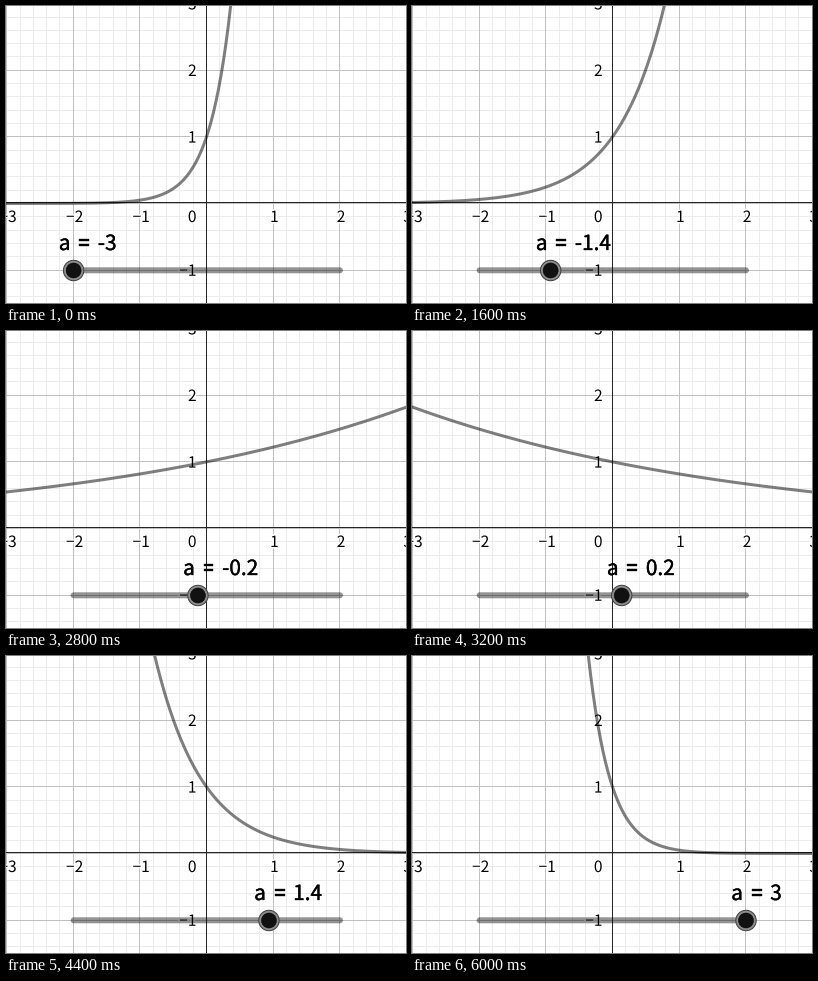
Write a matplotlib script that moves like this. It is 400 by 297 pixels and loops after 6200 ms.

```python
import numpy as np
import matplotlib.pyplot as plt
from matplotlib.animation import FuncAnimation
from matplotlib.patches import Circle
from matplotlib.patheffects import withStroke

W, H, DPI = 400, 297, 100
PX = 72 / DPI                # points per pixel
X0, Y0, UNIT = 200.5, 197.5, 66.6
FRAMES, LOOP = 31, 6200
TRACK_X, TRACK_Y, TRACK_HALF, A_MAX = 200.8, 264.3, 133.2, 3

plt.rcParams["font.family"] = "Noto Sans CJK JP"
fig = plt.figure(figsize=(W / DPI, H / DPI), dpi=DPI, facecolor="white")
ax = fig.add_axes([0, 0, 1, 1])
ax.set(xlim=(0, W), ylim=(H, 0))
ax.axis("off")


def px(x):
    return X0 + UNIT * x


def py(y):
    return Y0 - UNIT * y


def center(v):
    """Middle of the pixel that holds v."""
    return np.floor(v) + 0.5


def rule(x=None, y=None, color="black", z=1):
    xs, ys = ((center(x),) * 2, (0, H)) if y is None else ((0, W), (center(y),) * 2)
    ax.plot(xs, ys, color=color, lw=PX, zorder=z, snap=False)


def write(x, y, text, size, **kw):
    return ax.text(x, y, text, fontsize=size * PX, va="baseline", **kw)


def tick(x, y, n, ha):
    text = str(n).replace("-", "\u2212")
    write(x, y, text, 15.5, ha=ha, color="black", zorder=4,
          path_effects=[withStroke(linewidth=3 * PX, foreground="white")])


# Grid and axes
for k in range(-15, 16):
    color, z = ("#c0c0c0", 2) if k % 5 == 0 else ("#ececec", 1)
    rule(x=px(k / 5), color=color, z=z)
    rule(y=py(k / 5), color=color, z=z)
rule(x=X0, color="#252525", z=3)
rule(y=Y0 - 1, color="#252525", z=3)

for n in range(-3, 4):
    if n:
        tick(px(n) + 1.3, 216, n, "center")
for n in (-1, 1, 2, 3):
    tick(190.5, py(n) + 5.7, n, "right")
tick(190.5, 216, 0, "right")

# Curve and slider
xs = np.linspace(-3.1, 3.1, 500)
curve, = ax.plot([], [], color="black", alpha=0.5, lw=3 * PX, zorder=5)
ax.plot([TRACK_X - TRACK_HALF, TRACK_X + TRACK_HALF], [TRACK_Y] * 2,
        color="black", alpha=0.42, lw=6 * PX, solid_capstyle="round",
        snap=False, zorder=6)
ring = Circle((0, 0), 10.2, fc="#8c8c8c", ec="#404040", lw=PX, zorder=7)
knob = Circle((0, 0), 7.5, fc="#111111", ec="black", lw=0.5 * PX, zorder=8)
ax.add_patch(ring)
ax.add_patch(knob)

OFFSETS = (-14.8, 4.8, 24.2)
bolder = [withStroke(linewidth=0.35 * PX, foreground="black")]
parts = [write(0, 244, s, 20.8, color="black", zorder=9, path_effects=bolder)
         for s in ("a", "=", "")]


def update(i):
    a = round(-A_MAX + i * 2 * A_MAX / (FRAMES - 1), 1)
    curve.set_data(px(xs), py(np.exp(-a * xs)))
    x = TRACK_X + TRACK_HALF * a / A_MAX
    for dot in (ring, knob):
        dot.center = (x, TRACK_Y + 0.2)
    parts[2].set_text(f"{a + 0:g}")
    for part, dx in zip(parts, OFFSETS):
        part.set_x(x + dx)
    return curve, ring, knob, *parts


anim = FuncAnimation(fig, update, frames=FRAMES, interval=LOOP / FRAMES,
                     repeat=True, repeat_delay=0, blit=False)
plt.show()
```
